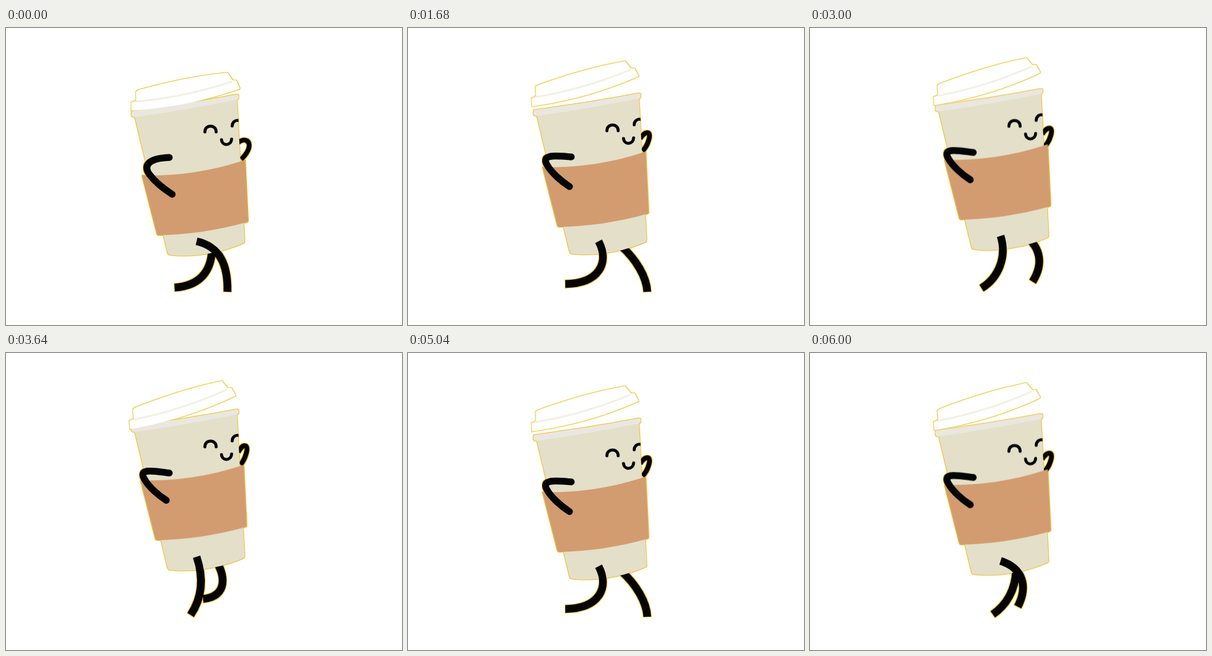
Write an HTML page without scripts that moves like this. It is 667 px wide and 500 px high and loops after 6040 ms.

```html
<!DOCTYPE html>
<html lang="en">
<head>
<meta charset="utf-8">
<title>Walking cup</title>
<style>
html, body { margin: 0; width: 100%; height: 100%; overflow: hidden; background: #fff; }
svg { display: block; width: 100%; height: 100%; }

/* One stride is 16 poses; nine strides make the loop. */
.bob, .sleeve, .lid, .arm, .leg {
  animation: 671.111ms step-end -4ms infinite;
}
.bob { animation-name: bob; }
.sleeve { animation-name: sleeve; }
.lid { animation-name: lid; transform-origin: 210px 139px; }
.near.arm { animation-name: near-arm; }
.far.arm { animation-name: far-arm; }
.near.leg { animation-name: near-leg; }
.far.leg { animation-name: far-leg; }

.line { fill: none; stroke: #050505; }
.leg { stroke-width: 13; }
.near.arm { stroke-width: 11.5; stroke-linecap: round; }
.far.arm { stroke-width: 8; }
.face { stroke-width: 5; stroke-linecap: round; }

@keyframes bob {
  0%, 100% { transform: none; }
  6.25%, 43.75%, 56.25%, 93.75% { transform: translateY(-9.5px); }
  12.5%, 37.5%, 62.5%, 87.5% { transform: translateY(-17px); }
  18.75%, 31.25%, 68.75%, 81.25% { transform: translateY(-21.7px); }
  25%, 75% { transform: translateY(-23.5px); }
  50% { transform: translateY(-2px); }
}
@keyframes sleeve {
  0%, 100% { transform: translate(0, 0); }
  12.5%, 62.5% { transform: translate(0, 0); animation-timing-function: steps(4); }
  37.5%, 43.75%, 87.5%, 93.75% { transform: translate(-2.5px, -16.8px); }
  50% { transform: translate(-2.5px, -12px); animation-timing-function: steps(2); }
}
@keyframes lid {
  0%, 100% { transform: translate(0, 0) rotate(0deg); }
  12.5%, 62.5% { transform: translate(0, 0) rotate(0deg); animation-timing-function: steps(4); }
  37.5%, 87.5% { transform: translate(-2px, -11px) rotate(-6.1deg); }
  43.75%, 93.75% { transform: translate(-1.5px, -9px) rotate(-5.6deg); }
  50% { transform: translate(-2px, -7px) rotate(-4.4deg); animation-timing-function: steps(2); }
}
@keyframes near-arm {
  0%, 100% { d: path("M275 218C245 219 228 229 242 247C251 259 266 271 280 280"); }
  12.5%, 62.5% {
    d: path("M275 218C245 219 228 229 242 247C251 259 266 271 280 280");
    animation-timing-function: steps(4);
  }
  37.5%, 43.75%, 87.5%, 93.75% { d: path("M275 219C250 216 222 210 233 229C240 242 257 257 270 265"); }
  50% {
    d: path("M275 219C248 217 224 214 234 232C241 245 258 260 272 269");
    animation-timing-function: steps(2);
  }
}
@keyframes far-arm {
  0%, 100% { d: path("M391 193C402 184 414 190 408 205Q404 214 396 221"); }
  12.5%, 62.5% {
    d: path("M391 193C402 184 414 190 408 205Q404 214 396 221");
    animation-timing-function: steps(4);
  }
  37.5%, 87.5% { d: path("M391 184C400 167 410 171 404 188Q401 198 395 205"); }
  43.75%, 93.75% { d: path("M391 188C401 173 411 176 405 192Q402 202 395 209"); }
  50% {
    d: path("M391 188C401 173 411 176 405 192Q402 202 395 209");
    animation-timing-function: steps(2);
  }
}
@keyframes near-leg {
  0%, 100% { d: path("M321 359C360 368 374 398 373 444"); animation-timing-function: steps(2); }
  12.5% { d: path("M321 343C337 370 340 405 333 444"); animation-timing-function: steps(4); }
  37.5% { d: path("M321 343C332 375 333 408 311 441"); }
  43.75% { d: path("M321 350C332 385 318 420 289 438"); }
  50% { d: path("M321 359C340 395 322 430 265 431"); animation-timing-function: steps(2); }
  62.5% { d: path("M321 343C336 390 318 413 285 414"); animation-timing-function: steps(4); }
  87.5% { d: path("M321 343C350 372 354 412 310 415"); }
  93.75% { d: path("M321 350C358 362 368 392 350 427"); }
}
@keyframes far-leg {
  0%, 100% { d: path("M347 372C346 408 328 434 284 437"); animation-timing-function: steps(2); }
  12.5% { d: path("M353 353C360 390 345 413 307 414"); animation-timing-function: steps(4); }
  37.5% { d: path("M352 347C370 373 374 410 332 414"); }
  43.75% { d: path("M355 345C388 365 395 395 375 427"); }
  50% { d: path("M358 366C385 390 402 420 403 444"); animation-timing-function: steps(2); }
  62.5% { d: path("M352 343C366 370 369 405 363 444"); animation-timing-function: steps(4); }
  87.5% { d: path("M352 343C361 375 360 408 332 441"); }
  93.75% { d: path("M347 366C346 400 330 425 308 440"); }
}
</style>
</head>
<body>
<svg viewBox="0 0 667 500">
  <defs>
    <filter id="halo" filterUnits="userSpaceOnUse" x="0" y="0" width="667" height="500" color-interpolation-filters="sRGB">
      <feMorphology in="SourceAlpha" operator="dilate" radius="1" result="wide"/>
      <feFlood flood-color="#eec22e"/>
      <feComposite in2="wide" operator="in" result="edge"/>
      <feMerge><feMergeNode in="edge"/><feMergeNode in="SourceGraphic"/></feMerge>
    </filter>
    <clipPath id="front"><path d="M200 100H389L394 210V240H200Z"/></clipPath>
  </defs>
  <g filter="url(#halo)">
    <path class="far leg line" d="M347 372C346 408 328 434 284 437"/>
    <g class="bob">
      <path class="far arm line" d="M391 193C402 184 414 190 408 205Q404 214 396 221"/>
      <path fill="#e4dfc8" d="M216 146L389 118L402 358Q402 362 398 363C360 380 310 387 276 382Q273 381 272 378Z"/>
      <path fill="#eae7df" d="M212 140C270 132 330 123 387 112Q392 111 392 116Q392 120 388 121C330 132 270 143 216 150Q211 150 211 145Z"/>
      <path class="sleeve" fill="#d29c70" d="M229 248C290 250 350 240 403 222L408 324Q408 326 405 327C355 341 305 348 258 349Q255 349 254 346Z"/>
      <g class="face line" clip-path="url(#front)">
        <path d="M335 175C335 162 354 162 354 175"/>
        <path d="M381 165C381 159 386 154 393 156"/>
        <path d="M363 188C364 199 379 199 380 187"/>
      </g>
      <path class="near arm line" d="M275 218C245 219 228 229 242 247C251 259 266 271 280 280"/>
    </g>
    <g class="lid">
      <path fill="#fff" d="M211 125L219 123V108Q220 105 224 104C270 91 322 80 373 75L382 88H388L394 102C340 122 270 136 211 139Z"/>
      <path fill="none" stroke="#f2f0e3" stroke-width="3" d="M217 124C275 119 330 107 381 90"/>
    </g>
    <path class="near leg line" d="M321 359C360 368 374 398 373 444"/>
  </g>
</svg>
</body>
</html>
```
